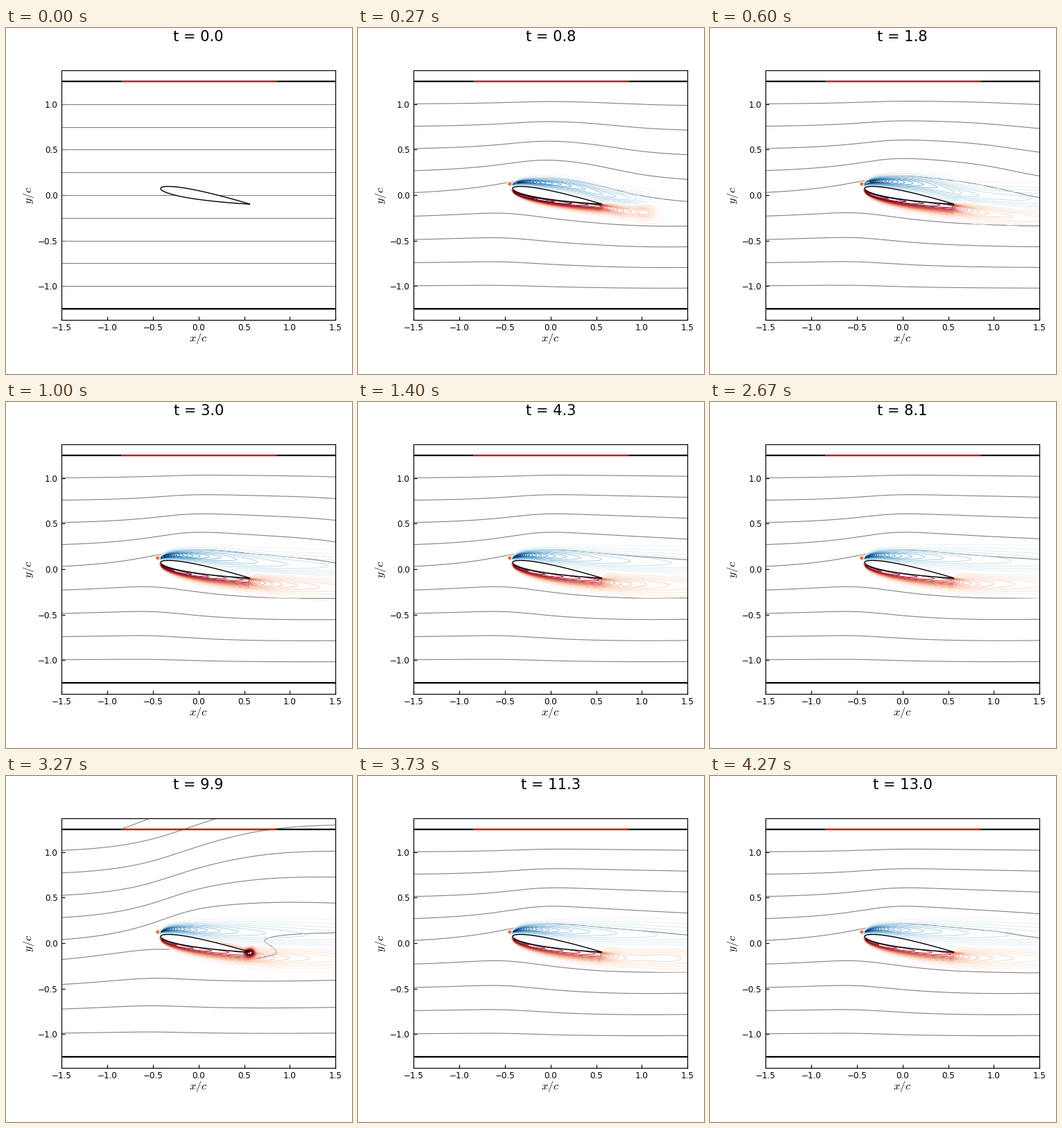
A matplotlib script for the animation above (4340 ms loop, 499 px wide and 499 px high).

```python
import numpy as np
import matplotlib.pyplot as plt
from matplotlib.animation import FuncAnimation

SIZE, DPI = 499, 64
PX = 72 / DPI                       # points per pixel
LEFT, TOP, WIDTH, HEIGHT = 80.2, 61.0, 395.0, 359.8
UX, UY = WIDTH / 3, 131.2           # pixels per chord
CX, CY = LEFT + WIDTH / 2, TOP + HEIGHT / 2

# The flow advances 15 steps a second; pictures come faster so that each
# step is up by the time it is due.
FRAMES, INTERVAL = 155, 28
STEPS, STEP_MS, DT = 65, 200 / 3, 0.2025

plt.rcParams.update({"font.family": "DejaVu Sans", "mathtext.fontset": "cm"})


def ux(px):
    return (px - CX) / UX


def uy(py):
    return (CY - py) / UY


def sigmoid(v):
    return 1 / (1 + np.exp(-np.clip(v, -60, 60)))


def bell(v):
    return np.exp(-v * v)


def smooth(x, xp, yp):
    """Cubic Hermite curve through a few points."""
    m = np.gradient(yp, xp)
    i = np.clip(np.searchsorted(xp, x) - 1, 0, len(xp) - 2)
    h = xp[i + 1] - xp[i]
    s = np.clip((x - xp[i]) / h, 0, 1)
    return ((1 + 2 * s) * (1 - s) ** 2 * yp[i] + s * (1 - s) ** 2 * h * m[i]
            + s * s * (3 - 2 * s) * yp[i + 1] + s * s * (s - 1) * h * m[i + 1])


# --- airfoil -------------------------------------------------------------
NOSE_X, NOSE_Y, TAIL_X = 223.0, 231.3, 352.0
TILT = np.radians(10)
CHORD = (TAIL_X - NOSE_X) / np.cos(TILT)


def half(s):
    return 0.5 * CHORD * (0.2969 * np.sqrt(s) - 0.126 * s - 0.3516 * s**2
                          + 0.2843 * s**3 - 0.1036 * s**4)


def foil():
    s = (1 - np.cos(np.linspace(0, np.pi, 70))) / 2
    s = np.r_[s, s[::-1]]
    n = half(s) * np.repeat([-1, 1], 70)
    x = NOSE_X + s * CHORD * np.cos(TILT) - n * np.sin(TILT)
    y = NOSE_Y + s * CHORD * np.sin(TILT) + n * np.cos(TILT)
    return ux(x), uy(y)


# --- streamlines -----------------------------------------------------------
LEVELS = np.arange(1, -1.01, -0.25)
SX = np.linspace(LEFT, LEFT + WIDTH, 260)


def pulse(t):
    return np.exp(-((t - 10) / 0.2) ** 2 / 2) / 0.92


def calm_rise(level):
    """Lift bump plus the spreading caused by foil and wake."""
    room = 1.25 - abs(level)
    lift = room * (7 + 4 * room**2) / np.cosh((SX - 243) / 75)
    wake = 12.3 * room * sigmoid((SX - 238) / 24)
    wake *= 1 - 0.2 * (np.maximum(SX - 330, 0) / 145) ** 2
    return lift + (wake if level >= 0 else -wake)


def blown_rise(level):
    """Extra rise while fluid leaves through the red part of the wall."""
    if level >= 0:
        return (45 + 31 * level) * sigmoid((SX - 285) / 57)
    return 30 * (1.25 + level) ** 1.5 * sigmoid((SX - 195) / 90)


def streamline(level, t):
    y = np.full_like(SX, CY - level * UY)
    if t == 0:
        return y
    p = pulse(t)
    y -= (1 - 0.4 * np.exp(-t / 0.5)) * calm_rise(level) + p * blown_rise(level)
    sag = np.interp(level, [-1, -0.25, 0, 0.25, 1], [1, 4, 23, 21, 4.5])
    y += sag * sigmoid((SX - 317 - 66 * t) / 33)
    late = np.clip((t - 10.5) / 2.5, 0, 1)
    y += 7 * late * bell(level / 0.2) * sigmoid((SX - 440) / 15)
    if level == -0.25 and p > 0.6:          # meets the foil
        y[SX > 236] = np.nan
    return y


# --- vorticity -------------------------------------------------------------
gx, gy = np.meshgrid(np.arange(208, 477, 1.4), np.arange(198, 300, 0.9))
axis_y = NOSE_Y + (gx - NOSE_X) * np.tan(TILT)
depth = half(np.clip((gx - NOSE_X) / (TAIL_X - NOSE_X), 0, 1))
top_y, bottom_y = axis_y - depth, axis_y + depth
below = sigmoid((gy - axis_y) / 0.8)
shield = np.exp(-np.maximum(gx - TAIL_X, 0) / 10)
run = np.maximum(gx - 222, 1)
onset = sigmoid((gx - 222.5) / 0.8)

upper_mid = (220.3 + 0.05 * np.maximum(gx - 245, 0)
             + 7 * np.exp(-np.maximum(gx - 220, 0) / 8))
upper_wide = np.maximum(1.27 * np.sqrt(run) + 0.3, 2.5)
lower_mid = np.minimum(bottom_y + 2.5, 261.5)
lower_wide = 1 + np.sqrt(run)


def blob(x, y, r):
    return bell(np.hypot(gx - x, gy - y) / r)


def vorticity(t):
    p = pulse(t)
    thin = min(1, t / 1.5) ** 0.5
    gain = 1 + 0.25 * np.exp(-max(t - 1.8, 0) / 2)
    sag = min(1, np.exp((1.8 - t) / 1.2))
    front = sigmoid((345 + 95 * t - gx) / 12)

    hug = np.minimum(top_y - 3, 251)
    mid = upper_mid + 19 * sag * sigmoid((gx - 345) / 17)
    mid = hug + (mid - hug) * (1 - np.exp(-t / 0.5))
    blue = 98 * (run + 9) ** -0.55 * gain * bell((gy - mid) / (upper_wide * thin))

    mid = lower_mid + 11 * sag * sigmoid((gx - 425) / 18)
    red = 35.3 * np.maximum(gx - 340, 9) ** -0.414 * gain
    red += 0.04 * np.maximum(340 - gx, 0)
    if t > 10:
        x = 352 + 75 * (t - 10)
        red *= 1 + min(1, (t - 10) / 0.4) * (0.18 * bell((gx - x) / 28)
                                             - 0.15 * bell((gx - x + 60) / 30))
    red *= bell((gy - mid) / (lower_wide * thin))

    w = front * onset * (red * (1 - (1 - below) * shield)
                         - blue * (1 - below * shield))
    w += 14 * blob(219, 225, 2.4)
    w += 4 * blob(352 + 80 * t, 258 + 6 * t, 14)
    skin = bell((gy - top_y + 1) / 3) * sigmoid((gx - 300) / 8)
    w += p * (16 * blob(352, 253, 6) + 7 * skin * sigmoid((356 - gx) / 2))
    return w


# --- stage -----------------------------------------------------------------
fig = plt.figure(figsize=(SIZE / DPI, SIZE / DPI), dpi=DPI, facecolor="white")
ax = fig.add_axes([LEFT / SIZE, 1 - (TOP + HEIGHT) / SIZE,
                   WIDTH / SIZE, HEIGHT / SIZE])
limit = HEIGHT / UY / 2
ax.set(xlim=(-1.5, 1.5), ylim=(-limit, limit), autoscale_on=False,
       xticks=np.arange(-1.5, 1.6, 0.5), yticks=np.arange(-1, 1.1, 0.5))
ax.tick_params(direction="in", length=5.2 * PX, width=1.2 * PX,
               pad=5.5 * PX, labelsize=12 * PX)
for spine in ax.spines.values():
    spine.set_linewidth(1.2 * PX)


def label(x, y, text, size, **kw):
    return fig.text(x / SIZE, 1 - y / SIZE, text, fontsize=size * PX,
                    ha="center", **kw)


title = label(CX, 19, "t = 0.0", 21, va="baseline")
label(CX, 448.3, "$x/c$", 16.5, va="center")
label(33, CY, "$y/c$", 16.5, va="center", rotation=90)

for y in (-1.25, 1.25):
    ax.plot([-1.5, 1.5], [y, y], color="black", lw=2.25 * PX, zorder=4)
ax.plot([-0.85, 0.85], [1.25, 1.25], color="#d81414", lw=2.25 * PX, zorder=4.5,
        solid_capstyle="butt")
ax.fill(*foil(), fc="white", ec="black", lw=1.4 * PX, zorder=5)


def gray_line():
    return ax.plot([], [], color="#808080", lw=1.1 * PX, zorder=2)[0]


lines = [gray_line() for _ in LEVELS]
lip, hook = gray_line(), gray_line()

# wake streamline that curls back to the trailing edge during the pulse
HOOK = np.array([(476, 226), (420, 228), (385, 232), (373, 238),
                 (387, 249), (388, 257), (362, 263)], float)
knots = np.arange(len(HOOK))
along = np.linspace(0, len(HOOK) - 1, 120)
hook.set_data(ux(smooth(along, knots, HOOK[:, 0])),
              uy(smooth(along, knots, HOOK[:, 1])))

RINGS = np.r_[-24:0, 1:25]
shown = {"step": None, "rings": None}


def update(i):
    step = min(int((i * INTERVAL + 32) / STEP_MS), STEPS - 1)
    if step == shown["step"]:
        return []
    t = step * DT
    p = pulse(t)
    title.set_text(f"t = {t:.1f}")
    for level, line in zip(LEVELS, lines):
        line.set_data(ux(SX), uy(streamline(level, t)))
    lip.set_data([-0.85, 0], [1.25, 1.25 + 0.32 * p])
    lip.set_visible(p > 0.05)
    hook.set_visible(p > 0.6)
    if shown["rings"]:
        shown["rings"].remove()
    rings = None
    if step:
        rings = ax.contour(ux(gx), uy(gy), vorticity(t), levels=RINGS,
                           cmap="RdBu_r", vmin=-19, vmax=19,
                           linewidths=0.85 * PX, zorder=3)
    shown.update(step=step, rings=rings)
    return []


anim = FuncAnimation(fig, update, frames=FRAMES, interval=INTERVAL,
                     repeat=True, repeat_delay=0, blit=False)
plt.show()
```
